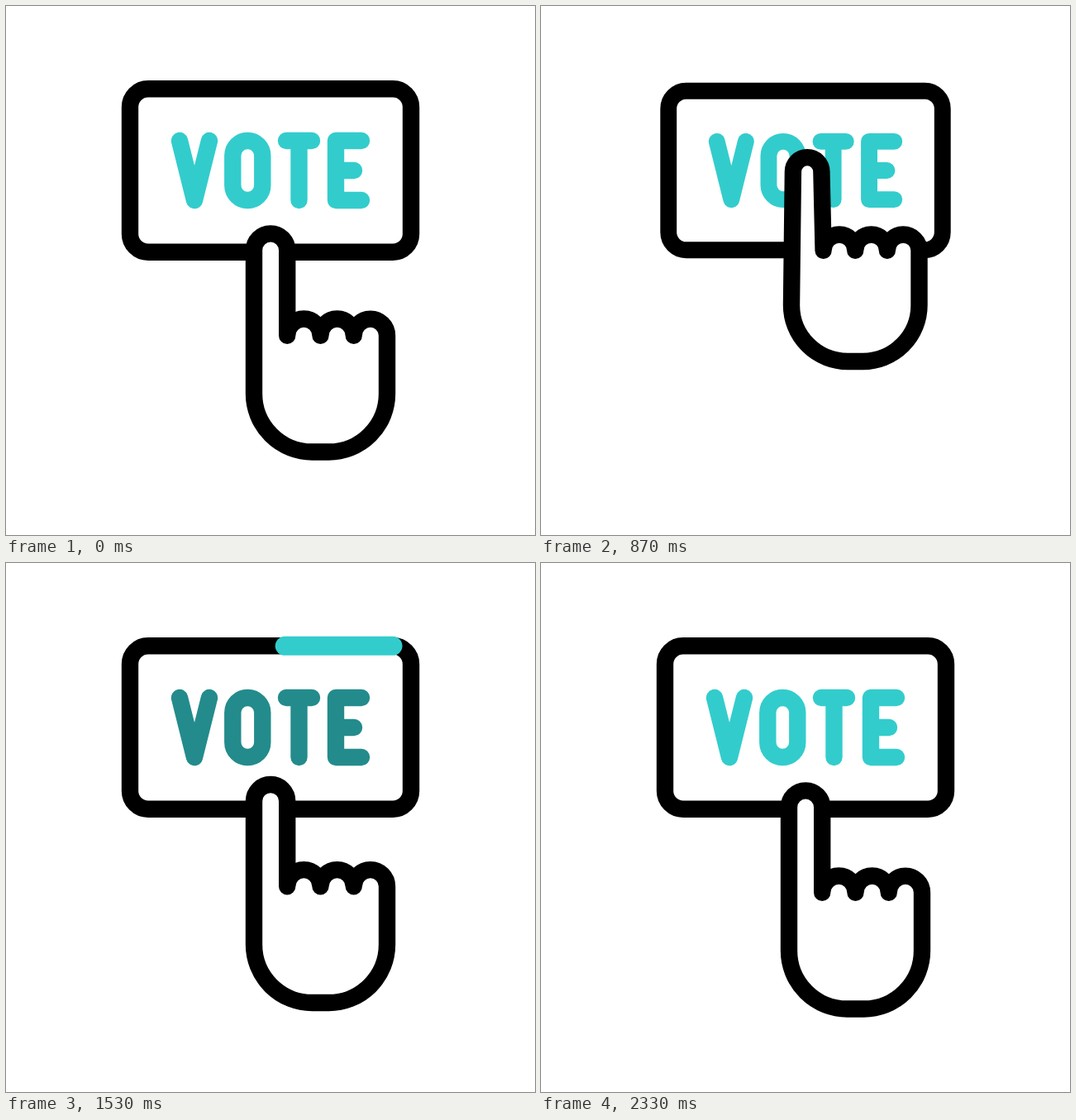
An HTML page for the animation above (2570 ms loop, 640x640 px).

```html
<!DOCTYPE html>
<html lang="en">
<head>
<meta charset="utf-8">
<title>Vote button</title>
<style>
  html, body { margin: 0; width: 100%; height: 100%; overflow: hidden; background: #fff; }
  svg { display: block; width: 100%; height: 100%; }
  path { fill: none; stroke: #000; stroke-width: 20.4; stroke-linecap: round; stroke-linejoin: round; }
  #hand { fill: #fff; }
  #ring { stroke: #33cccc; stroke-width: 23; }
</style>
</head>
<body>
<svg viewBox="0 0 640 640">
  <g id="button">
    <path id="border"/>
    <path id="letters" d="M210 163L228 235L246 163
      M274.3 181a18 18 0 0 1 36 0V217a18 18 0 0 1 -36 0Z
      M339 163H370M354.5 163V235
      M430 163H399V235H430M399 199H421"/>
  </g>
  <path id="ring" pathLength="1"/>
  <path id="hand"/>
</svg>
<script>
const LOOP = 2570, FPS = 30, LIFT = 97;
const $ = id => document.getElementById(id);
const mix = (a, b, k) => a + (b - a) * k;
const progress = (f, from, to) => Math.min(1, Math.max(0, (f - from) / (to - from)));
const smooth = p => p * p * (3 - 2 * p);
const ease = (f, from, to) => smooth(progress(f, from, to));

// Cubic bezier (.35, 0, .333, 1), solved by bisection
function glide(f, from, to) {
  const x = progress(f, from, to);
  let lo = 0, hi = 1;
  for (let i = 0; i < 24; i++) {
    const t = (lo + hi) / 2, u = 1 - t;
    if (3 * u * u * t * .35 + 3 * u * t * t * .333 + t * t * t < x) lo = t; else hi = t;
  }
  return smooth((lo + hi) / 2);
}

// Outline of the hand; k = 0 relaxed, k = 1 pressing
function handPath(k) {
  const m = (a, b) => mix(a, b, k);
  const left = m(300, 303), right = m(461, 457.5), palm = m(372, 362), curve = m(70.5, 68);
  const tipY = m(198.5, 200.4), tipL = m(300, 304.9), tipR = m(340.2, 339.4), tip = (tipR - tipL) / 2;
  const base = m(340.2, 341.6), knuckleY = m(301.7, 295.8), knuckle = (right - base) / 6;
  const bump = `a${knuckle} ${knuckle} 0 0 1 ${knuckle * 2} 0`;
  return `M${base} ${knuckleY}${bump}${bump}${bump}V${palm}
    a${curve} ${curve} 0 0 1 ${-curve} ${curve}H${left + curve}
    a${curve} ${curve} 0 0 1 ${-curve} ${-curve}L${tipL} ${tipY}
    A${tip} ${tip} 0 0 1 ${tipR} ${tipY}Z`;
}

const frame = "M468 100.3H172a22 22 0 0 0 -22 22V275.7a22 22 0 0 0 22 22H468a22 22 0 0 0 22 -22V122.3a22 22 0 0 0 -22 -22Z";
$("border").setAttribute("d", frame);
$("ring").setAttribute("d", frame);

function draw(ms) {
  const f = Math.floor(ms * FPS / 1000 + .101);
  const raised = glide(f, 0, 14) - glide(f, 36, 50);
  const press = ease(f, 18, 26) - ease(f, 26, 34);
  const dark = ease(f, 26, 39) - ease(f, 39, 57);
  const head = ease(f, 42, 60), tail = ease(f, 52, 70);

  $("button").setAttribute("transform", `translate(320 199) scale(${1 - .025 * press}) translate(-320 -199)`);
  $("letters").style.stroke = `rgb(${[51, 204, 204].map(c => Math.round(c * (1 - .48 * dark)))})`;

  const ring = $("ring");
  ring.style.display = head > tail ? "" : "none";
  ring.setAttribute("stroke-dasharray", `${head - tail} 2`);
  ring.setAttribute("stroke-dashoffset", -tail);

  $("hand").setAttribute("d", handPath(press));
  $("hand").setAttribute("transform", `translate(0 ${LIFT * (1 - raised)})`);
}

const start = performance.now();
function tick() {
  draw((performance.now() - start) % LOOP);
  requestAnimationFrame(tick);
}
tick();
</script>
</body>
</html>
```
